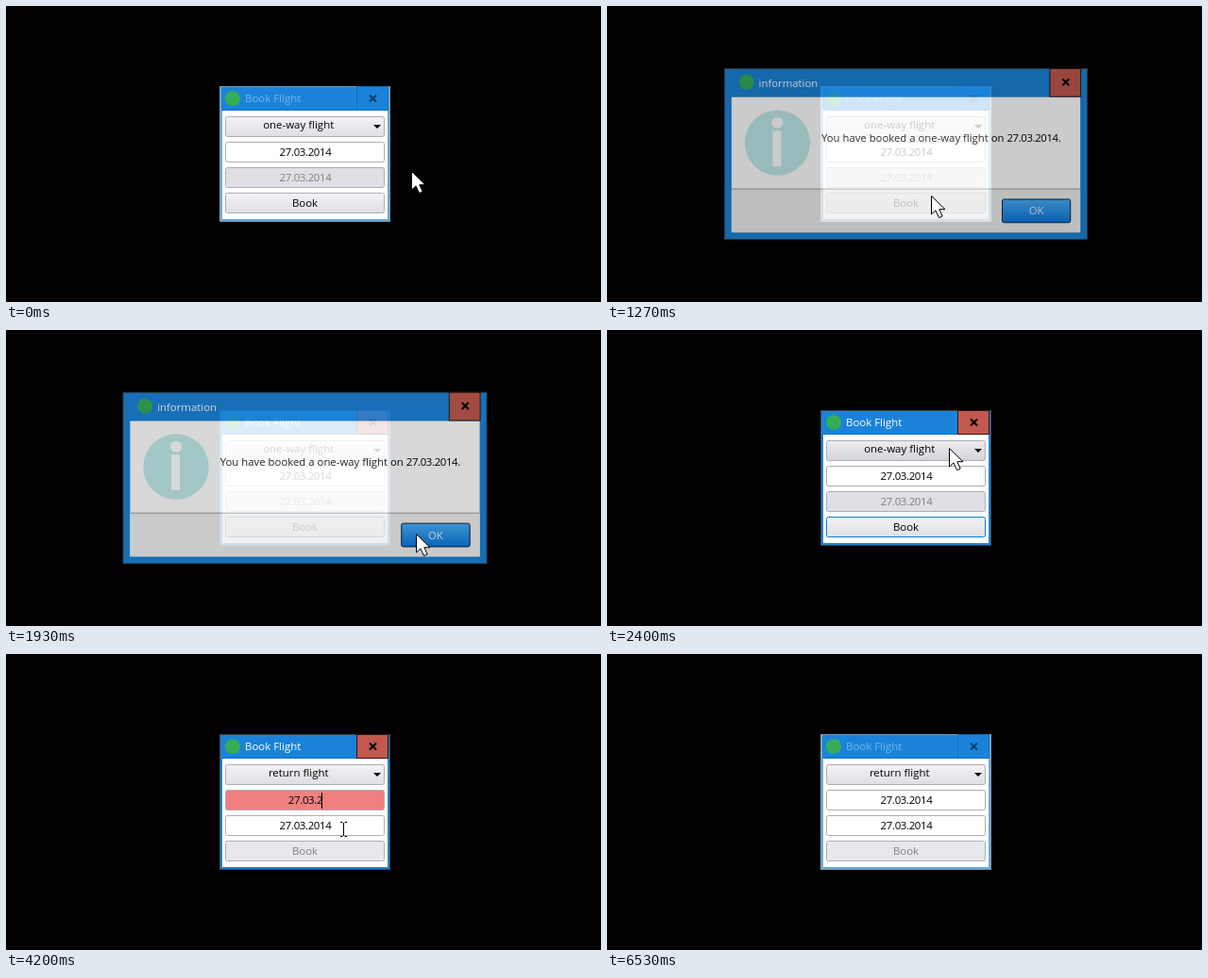
Recreate the animation shown at these times as an HTML page. Size 630 px wide and 314 px high, loop 6670 ms.

```html
<!DOCTYPE html>
<html lang="en">
<head>
<meta charset="utf-8">
<title>Flight booking demo</title>
<style>
  html, body { margin: 0; width: 100%; height: 100%; overflow: hidden; background: #000; }
  svg { display: block; width: 630px; height: 314px; }
  text { font: 11.45px "Open Sans", "Noto Sans", sans-serif; fill: #000; white-space: pre; }
  .mid { text-anchor: middle; }
  .title { fill: #fff; }
  .date { letter-spacing: -.36px; }
  .box { stroke: #adadb5; }
  .input { fill: #fff; }
  .button { fill: url(#grey); }
  .orb { fill: #35ad58; }
  .bar { fill: #1a83d9; }
  .frame { fill: #1a83d9; stroke: #3f4347; }
  .close { fill: #c1594f; stroke: #2a1715; }
  .cross { stroke: #000; stroke-width: 2.1; fill: none; }
  .edge { stroke: #1672bf; }

  .idle .frame { fill: #65abdf; stroke: #8595a2; }
  .idle .close { fill: #1a83d9; stroke: #176fb8; }
  .idle .cross { stroke: #123f69; }
  .idle .title { fill: #78b5e7; }
  .focus .box { stroke: #0c7cd5; }
  .bad .box { fill: #f08080; }
  .pressed .box { fill: #d3d4da; }
  .over .button { fill: url(#dark); }
  .off text { fill: #7f8085; }
  .off .input { fill: #dfe0e5; }
  .off .button { fill: #e7e8eb; }
  .hover rect { fill: #0c7cd5; }
  .hover text { fill: #fff; }
</style>
</head>
<body>
<svg viewBox="0 0 630 314">
  <defs>
    <linearGradient id="grey" x2="0" y2="1">
      <stop stop-color="#f3f3f6"/><stop offset="1" stop-color="#dedfe4"/>
    </linearGradient>
    <linearGradient id="dark" x2="0" y2="1">
      <stop stop-color="#ededf0"/><stop offset="1" stop-color="#d3d4d9"/>
    </linearGradient>
    <linearGradient id="blue" x2="0" y2="1">
      <stop stop-color="#4caef9"/><stop offset="1" stop-color="#0b77db"/>
    </linearGradient>
  </defs>

  <g id="main">
    <rect class="frame" x="226.5" y="85.5" width="180" height="143"/>
    <rect class="bar" x="228" y="86" width="177" height="25"/>
    <path class="edge" d="M229 110.5h175"/>
    <rect x="229" y="111" width="175" height="115" fill="#fff"/>
    <circle class="orb" cx="240" cy="98" r="8"/>
    <text class="title" x="253" y="102">Book Flight</text>
    <rect class="close" x="371.5" y="85.5" width="33" height="25"/>
    <path class="cross" d="M385 94.5l7 7m0-7l-7 7"/>

    <g id="combo">
      <rect class="box button" x="232.5" y="117.5" width="168" height="21" rx="2"/>
      <text class="mid" x="309.7" y="130"></text>
      <path d="M389 126h8l-4 4z"/>
    </g>
    <g id="depart">
      <rect class="box input" x="232.5" y="144.5" width="168" height="21" rx="2"/>
      <text class="mid date" x="317" y="159"></text>
    </g>
    <g id="back">
      <rect class="box input" x="232.5" y="171.5" width="168" height="21" rx="2"/>
      <text class="mid date" x="317" y="186">27.03.2014</text>
    </g>
    <g id="book">
      <rect class="box button" x="232.5" y="198.5" width="168" height="21" rx="2"/>
      <text class="mid" x="316.5" y="213">Book</text>
    </g>
    <rect id="caret" y="147" width="1" height="17"/>

    <g id="popup">
      <rect class="box input" x="232.5" y="139.5" width="168" height="47"/>
      <g id="oneWay">
        <rect x="233" y="141" width="167" height="22" fill="#fff"/>
        <text class="mid" x="309.7" y="156">one-way flight</text>
      </g>
      <g id="twoWay">
        <rect x="233" y="163" width="167" height="22" fill="#fff"/>
        <text class="mid" x="309.7" y="178">return flight</text>
      </g>
    </g>
  </g>

  <g id="dialog">
    <rect class="frame" x="122.5" y="65.5" width="388" height="183"/>
    <path class="edge" d="M130 95.5h373M130 241.5h373"/>
    <rect x="130" y="96" width="373" height="145" fill="#fff"/>
    <path d="M130 194h373v47h-373z" fill="#efefef"/>
    <path d="M130 194.5h373" stroke="#a2a2a2"/>
    <circle class="orb" cx="146" cy="80" r="8"/>
    <text class="title" x="159" y="85">information</text>
    <rect class="close" x="470.5" y="65.5" width="33" height="30"/>
    <path class="cross" d="M484 76.5l7 7m0-7l-7 7"/>
    <circle cx="179" cy="145" r="35" fill="#c1eaea"/>
    <circle cx="179" cy="123.5" r="6" fill="#fff"/>
    <rect x="174" y="132" width="9" height="38" fill="#fff"/>
    <text x="226" y="144">You have booked a one-way flight on <tspan class="date">27.03.2014.</tspan></text>
    <rect x="419.5" y="205.5" width="73" height="25" rx="2" fill="url(#blue)" stroke="#08213b"/>
    <text class="mid" x="456" y="222" style="fill:#e8f4ff">OK</text>
  </g>

  <path id="arrow" d="M.5 .5V20L5 15.9L8.5 23.6L12.2 22L8.8 14.7H15Z" fill="#fff" stroke="#000"/>
  <path id="beam" d="M-3 -7.5H-.5M1.5 -7.5H4M.5 -7V7M-3 7.5H-.5M1.5 7.5H4" stroke="#000" fill="none"/>
</svg>

<script>
const LOOP = 6670, STEP = 200 / 3, FRAMES = 100;
const DATE = "27.03.2014", DIGIT = 6;

// Moments of the story, in ms
const at = {
  press: 1000, popUp: 1067, ok: 1900, list: 2530, pick: 2930, field: 3330,
  erase: 4060, retype: 4460, leave: 5990, blur: 6530
};

// Pointer glides: start, end, and the place reached
const glides = [
  [0, 400, 342, 126], [400, 600, 301, 160], [600, 950, 343, 201],
  [1330, 1780, 435, 217], [1930, 2400, 362, 125], [2530, 2800, 390, 167],
  [2870, 3260, 354, 163], [3400, 3730, 357, 186], [4400, 5060, 355, 176],
  [5270, 5930, 199, 300]
];

const $ = id => document.getElementById(id);
const clamp = (v, top) => Math.min(top, Math.max(0, v));
const ramp = (t, a, b) => clamp((t - a) / (b - a), 1);
const easeOut = p => 1 - (1 - p) ** 2;
const between = (v, a, b) => v >= a && v < b;
const show = (id, on) => { $(id).style.display = on ? "" : "none"; };
const mark = (id, name, on) => $(id).classList.toggle(name, on);
const write = (id, s) => { $(id).querySelector("text").textContent = s; };
const place = (id, x, y) => $(id).setAttribute("transform", `translate(${x} ${y})`);

function pointerAt(t) {
  let x = 429, y = 175;
  for (const [from, to, toX, toY] of glides) {
    const p = easeOut(ramp(t, from, to));
    x += (toX - x) * p;
    y += (toY - y) * p;
  }
  return [Math.round(x), Math.round(y)];
}

// Three characters are erased one per step, then typed again
function typedLength(t) {
  const erased = clamp(Math.ceil((t - at.erase) / STEP), 3);
  const typed = clamp(Math.ceil((t - at.retype) / 200), 3);
  return DATE.length - erased + typed;
}

function drawDialog(t) {
  const enter = easeOut(ramp(t, at.popUp, 1430));
  const level = enter * (1 - ramp(t, at.ok, 2120));
  const size = .95 + .05 * level;
  show("dialog", level > 0);
  $("dialog").setAttribute("opacity", level);
  $("dialog").setAttribute("transform",
    `translate(316.5 157) scale(${size}) translate(-316.5 -157)`);
}

function drawForm(t, twoWay) {
  const length = typedLength(t);
  const caretOn = between(t, at.field, at.blur) && Math.floor(t / 500) % 2 === 0;
  mark("main", "idle", !between(t, at.press, at.popUp - 1) && !between(t, at.ok, at.blur));
  write("combo", twoWay ? "return flight" : "one-way flight");
  write("depart", DATE.slice(0, length));
  mark("combo", "focus", between(t, at.pick, at.field));
  mark("book", "focus", between(t, at.ok, at.list));
  mark("book", "pressed", between(t, at.press, at.popUp - 1));
  mark("back", "off", !twoWay);
  mark("depart", "bad", length < DATE.length);
  mark("book", "off", t >= at.erase);
  show("caret", caretOn);
  $("caret").setAttribute("x", 343 - Math.round((DATE.length - length) * DIGIT / 2));
}

function drawPointer(t, twoWay) {
  const [x, y] = pointerAt(t);
  const listOpen = between(t, at.list, at.pick);
  const inside = between(x, 232, 401);
  const onField = between(y, 144, 166) || twoWay && between(y, 171, 193);
  const covered = listOpen || between(t, at.popUp, 2120);
  const beam = inside && onField && !covered;
  const here = t < at.leave;
  show("arrow", here && !beam);
  show("beam", here && beam);
  place("arrow", x, y);
  place("beam", x, y);
  show("popup", listOpen);
  mark("combo", "over", here && inside && between(y, 117, 139));
  mark("oneWay", "hover", y < 163);
  mark("twoWay", "hover", y >= 163);
}

function draw(t) {
  const twoWay = t >= at.pick;
  drawForm(t, twoWay);
  drawDialog(t);
  drawPointer(t, twoWay);
}

const start = performance.now();
let shown = -1;

function tick() {
  const t = (performance.now() - start) % LOOP;
  const frame = Math.min(FRAMES - 1, Math.floor((t + 5) / STEP));
  if (frame !== shown) draw(frame * STEP);
  shown = frame;
  requestAnimationFrame(tick);
}
tick();
</script>
</body>
</html>
```
